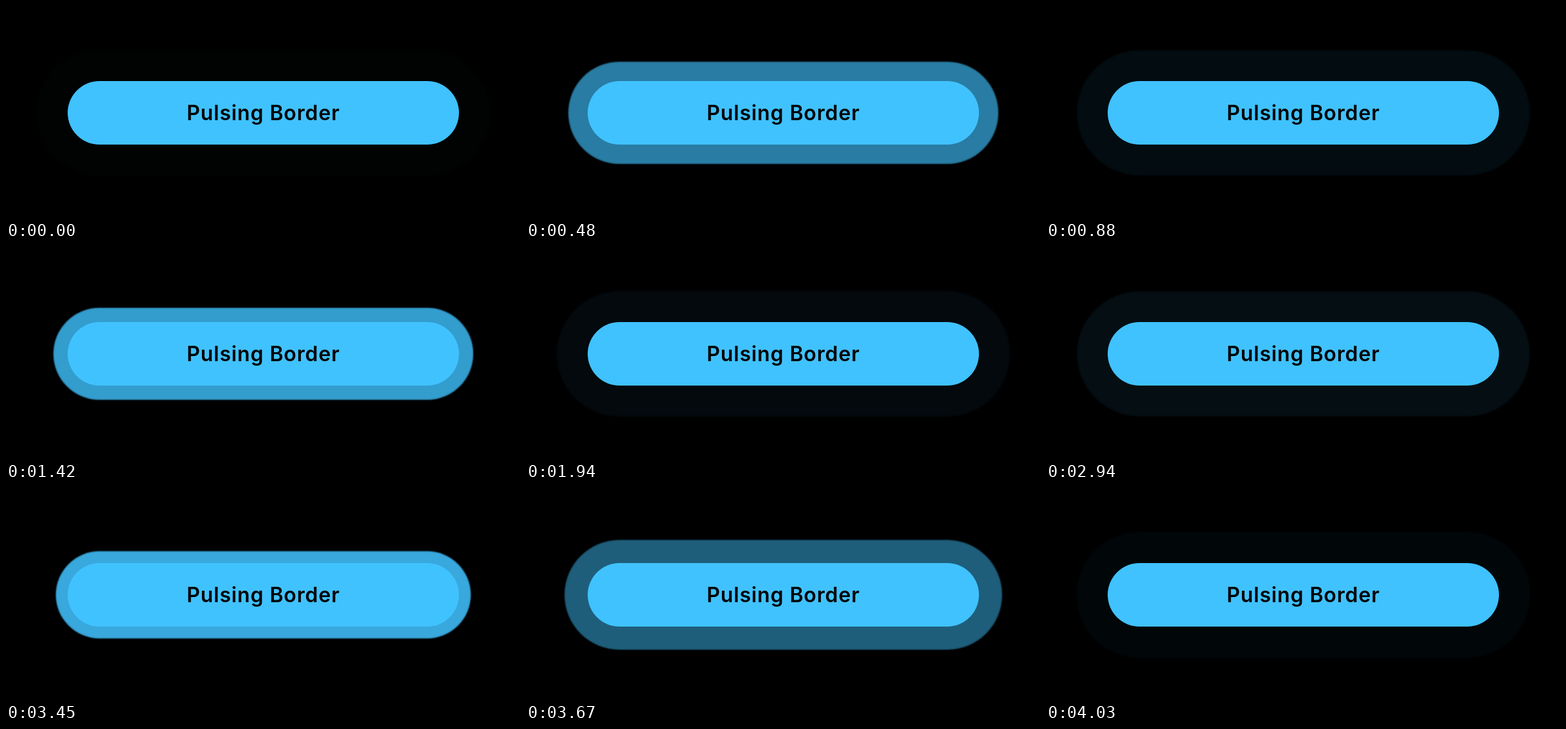
Write an HTML page without scripts that moves like this. It is 800x332 px and loops after 4.06 s.

```html
<!DOCTYPE html>
<html lang="en">
<head>
<meta charset="utf-8">
<title>Pulsing Border</title>
<style>
  html, body {
    margin: 0;
    width: 100%;
    height: 100%;
    overflow: hidden;
  }

  html { background: #000; }

  .button {
    --blue: 64 194 255;
    position: absolute;
    left: 95.5px;
    top: 116.75px;
    width: 609px;
    height: 99.5px;
    border-radius: 50px;
    background: rgb(var(--blue));
    color: #000;
    font: 600 32px/99.5px Inter, sans-serif;
    letter-spacing: .88px;
    text-align: center;
    text-indent: 1px;
  }

  /* Two stacked rings: the glow stays strong early and fades late.
     They start 1px inside the button, behind it, to avoid a seam. */
  .button::before,
  .button::after {
    content: "";
    position: absolute;
    z-index: -1;
    inset: 1px;
    border-radius: 49px;
    animation: pulse 4060ms infinite;
  }

  /* A pulse starts every 1034.5 ms and lasts 860 ms; the loop cuts the fourth. */
  @keyframes pulse {
    0% {
      box-shadow: 0 0 2px 50.7px rgb(var(--blue) / .008);
      animation-timing-function: step-end;
    }
    5.05%, 30.53%, 56.01% {
      box-shadow: 0 0 2px 1px rgb(var(--blue));
      animation-timing-function: cubic-bezier(0, 0, .33, 1);
    }
    26.23%, 51.71%, 77.19% {
      box-shadow: 0 0 2px 51px rgb(var(--blue) / 0);
      animation-timing-function: step-end;
    }
    81.49% {
      box-shadow: 0 0 2px 1px rgb(var(--blue));
      animation-timing-function: cubic-bezier(0, 0, .33, .885);
    }
    100% {
      box-shadow: 0 0 2px 50.4px rgb(var(--blue) / .012);
    }
  }
</style>
</head>
<body>
  <div class="button">Pulsing Border</div>
</body>
</html>
```
